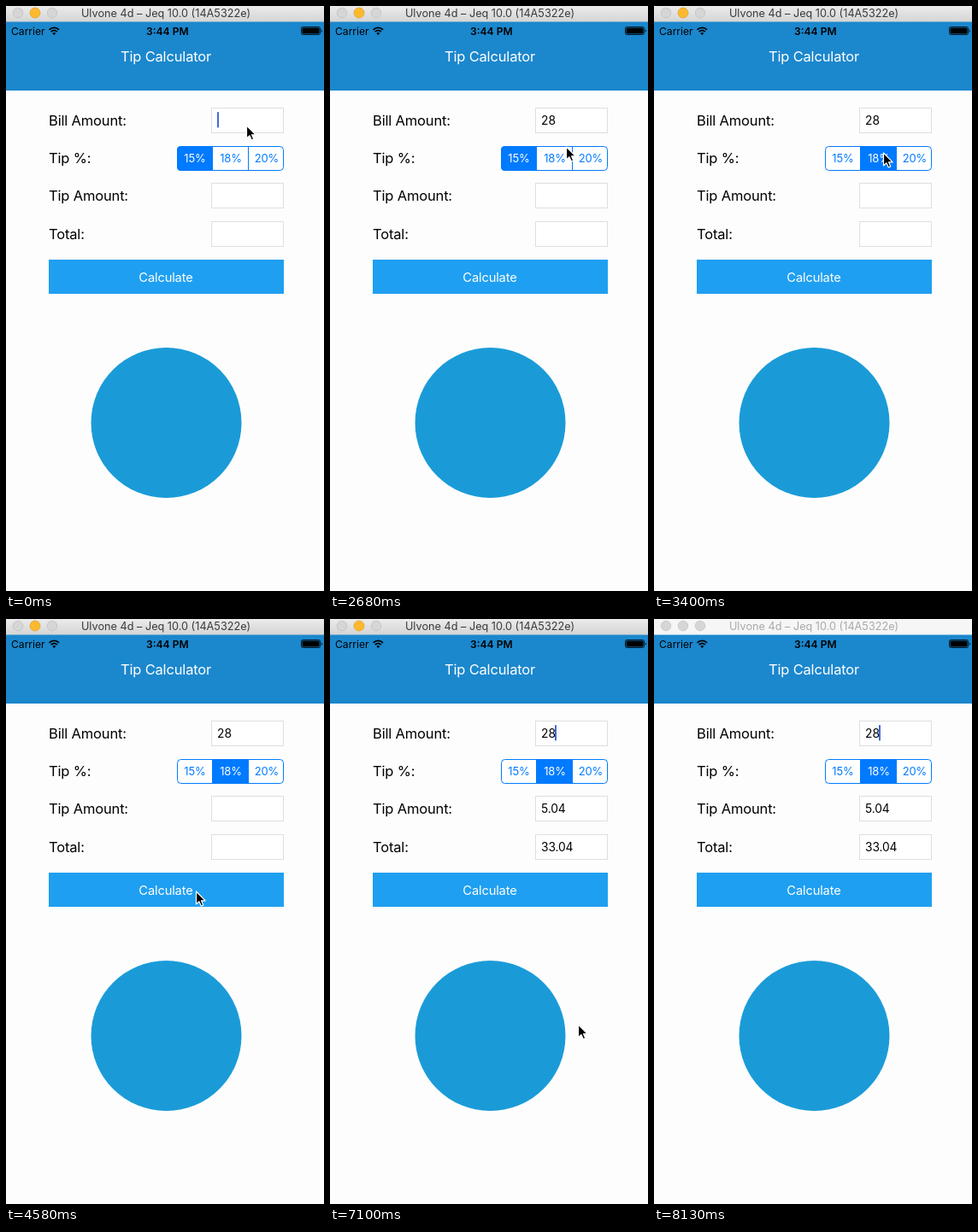
Animation, 372 px wide and 685 px high, one loop 8.23 s. Source, as an HTML page:

```html
<!DOCTYPE html>
<html lang="en">
<head>
<meta charset="utf-8">
<title>Tip Calculator</title>
<style>
  html, body { margin: 0; width: 100%; height: 100%; overflow: hidden; background: #fdfdfd; }
  svg { display: block; width: 372px; height: 685px; }
  text { font-family: Inter, Roboto, sans-serif; font-size: 16.5px; letter-spacing: -.01em; }
  .mid { text-anchor: middle; }
  .white { fill: #fff; }
  .bar-text { font-size: 12.7px; letter-spacing: 0; }
  .status { font-size: 12.1px; letter-spacing: 0; }
  .value { font-size: 13.8px; }
  .seg { font-size: 13px; }
  .field { fill: #fff; stroke: #dedede; }

  .anim, .anim * { animation: 8230ms step-end infinite; }
  .caret { animation-name: type, blink; }
  .d1 { animation-name: digit1; }
  .d2 { animation-name: digit2; }
  .pick15 { animation-name: pick15; }
  .pick18 { animation-name: pick18; }
  .press { animation-name: press; }
  .result { animation-name: result; }
  .idle { animation-name: idle; }
  .pointer { animation-name: point; }

  @keyframes type {
    0% { transform: none; }
    14.45% { transform: translateX(8px); }
    21.74%, 100% { transform: translateX(16px); }
  }
  @keyframes blink {
    0%, 10.81%, 36.08%, 46.78%, 59.29%, 70.1%, 82.62%, 95.26%, 100% { opacity: 1; }
    3.52%, 8.99%, 27.09%, 34.26%, 39.61%, 44.95%, 52.12%, 57.47%,
    62.94%, 68.28%, 75.45%, 80.8%, 88.09%, 93.43% { opacity: .5; }
    5.34%, 28.91%, 41.31%, 53.94%, 64.76%, 77.15%, 89.91% { opacity: 0; }
  }
  @keyframes digit1 { 0% { opacity: 0; } 14.45%, 100% { opacity: 1; } }
  @keyframes digit2 { 0% { opacity: 0; } 21.74%, 100% { opacity: 1; } }
  @keyframes pick15 { 0% { opacity: 1; } 39.61% { opacity: .5; } 41.31%, 100% { opacity: 0; } }
  @keyframes pick18 { 0% { opacity: 0; } 39.61% { opacity: .5; } 41.31%, 100% { opacity: 1; } }
  @keyframes press {
    0%, 68.28%, 100% { opacity: 1; }
    64.76% { opacity: .2; }
    66.46% { opacity: .6; }
  }
  @keyframes result { 0% { opacity: 0; } 66.46%, 100% { opacity: 1; } }
  @keyframes idle { 0% { opacity: 0; } 98.78%, 100% { opacity: 1; } }
  @keyframes point {
    0% { transform: translate(281px, 140px); }
    27.09% { transform: translate(281px, 140px); animation-timing-function: steps(3); }
    32.56% { transform: translate(276px, 165px); animation-timing-function: steps(3); }
    37.91% { transform: translate(268px, 172px); }
    44.95% { transform: translate(268px, 172px); animation-timing-function: steps(6); }
    55.65% { transform: translate(222px, 319px); }
    57.47% { transform: translate(221px, 321px); }
    86.26% { transform: translate(290px, 475px); animation-timing-function: steps(3); }
    91.61%, 100% { transform: translate(320px, 690px); }
  }
</style>
</head>
<body>
<svg viewBox="0 0 372 685">
  <defs>
    <linearGradient id="chrome" x2="0" y2="1">
      <stop stop-color="#ebebeb"/>
      <stop offset="1" stop-color="#d4d4d4"/>
    </linearGradient>
    <g id="lights" stroke-width=".8">
      <circle cx="14" cy="8" r="5.8"/>
      <circle cx="34" cy="8" r="5.8"/>
      <circle cx="54" cy="8" r="5.8"/>
    </g>
  </defs>

  <!-- window bar -->
  <rect width="372" height="19" fill="url(#chrome)"/>
  <use href="#lights" fill="#d6d6d6" stroke="#c2c2c2"/>
  <circle cx="34" cy="8" r="6" fill="#fdb92e" stroke="#e2a024" stroke-width=".6"/>
  <text class="mid bar-text" x="187" y="13" fill="#3a3a3a">Ulvone 4d – Jeq 10.0 (14A5322e)</text>
  <g class="anim"><g class="idle">
    <rect width="372" height="19" fill="#f6f6f6"/>
    <use href="#lights" fill="#d6d6d6" stroke="#c6c6c6"/>
    <text class="mid bar-text" x="187" y="13" fill="#a9a9a9">Ulvone 4d – Jeq 10.0 (14A5322e)</text>
  </g></g>

  <!-- status and header -->
  <rect y="18.5" width="372" height="80.5" fill="#1b87cd"/>
  <text class="status" x="6" y="33.5">Carrier</text>
  <g fill="none" stroke="#000" stroke-width="1.7">
    <path d="M50.6 27.8a8 8 0 0 1 11.4 0M52.7 30.2a5 5 0 0 1 7.2 0"/>
    <path d="M56.3 34l-2-2a2.8 2.8 0 0 1 4 0z" fill="#000" stroke="none"/>
  </g>
  <text class="mid status" x="188.800" y="33.5" font-weight="600">3:44 PM</text>
  <rect x="345.500" y="24.500" width="22" height="9" rx="1.800" fill="none" stroke="#000" stroke-width=".8"/>
  <rect x="346.500" y="25.500" width="20" height="7" rx="1"/>
  <path d="M368.800 27.200q2 1.800 0 3.600z"/>
  <text class="mid white" x="187" y="65">Tip Calculator</text>

  <!-- form -->
  <text x="50" y="140">Bill Amount:</text>
  <text x="50" y="184">Tip %:</text>
  <text x="50" y="228">Tip Amount:</text>
  <text x="50" y="273">Total:</text>
  <rect class="field" x="240.500" y="119.500" width="84" height="29"/>
  <rect class="field" x="240.500" y="207.500" width="84" height="29"/>
  <rect class="field" x="240.500" y="252.500" width="84" height="29"/>

  <g fill="#007aff">
    <rect x="200.500" y="164.500" width="124" height="28" rx="4" fill="#fff" stroke="#007aff"/>
    <path d="M241.500 164.500v28M283.500 164.500v28" stroke="#007aff"/>
    <text class="mid seg" x="221" y="183">15%</text>
    <text class="mid seg" x="263" y="183">18%</text>
    <text class="mid seg" x="305" y="183">20%</text>
  </g>
  <rect x="50" y="297" width="275" height="40" fill="#1f9ff1"/>

  <!-- logo placeholder -->
  <circle cx="187.500" cy="488" r="88" fill="#1a9bd8"/>

  <g class="anim">
    <g class="pick15">
      <path d="M242 164H204.500a4.500 4.500 0 0 0-4.500 4.500v20a4.500 4.500 0 0 0 4.500 4.500H242z" fill="#007aff"/>
      <text class="mid seg white" x="221" y="183">15%</text>
    </g>
    <g class="pick18">
      <rect x="241" y="164" width="43" height="29" fill="#007aff"/>
      <text class="mid seg white" x="263" y="183">18%</text>
    </g>
    <text class="value d1" x="247" y="139">2</text>
    <text class="value d2" x="255.500" y="139">8</text>
    <rect class="caret" x="247" y="124" width="2" height="18.500" rx=".8" fill="#426bd9"/>
    <text class="value result" x="247" y="227">5.04</text>
    <text class="value result" x="247" y="272">33.04</text>
    <text class="mid white press" x="187" y="322.500" style="font-size:14.700px">Calculate</text>
    <path class="pointer" d="M.5 0V15L4 11.800 6.300 17 8.800 15.900 6.500 10.800H11.200Z"
      stroke="#fff" stroke-width="1.200" stroke-linejoin="round"/>
  </g>
</svg>
</body>
</html>
```
